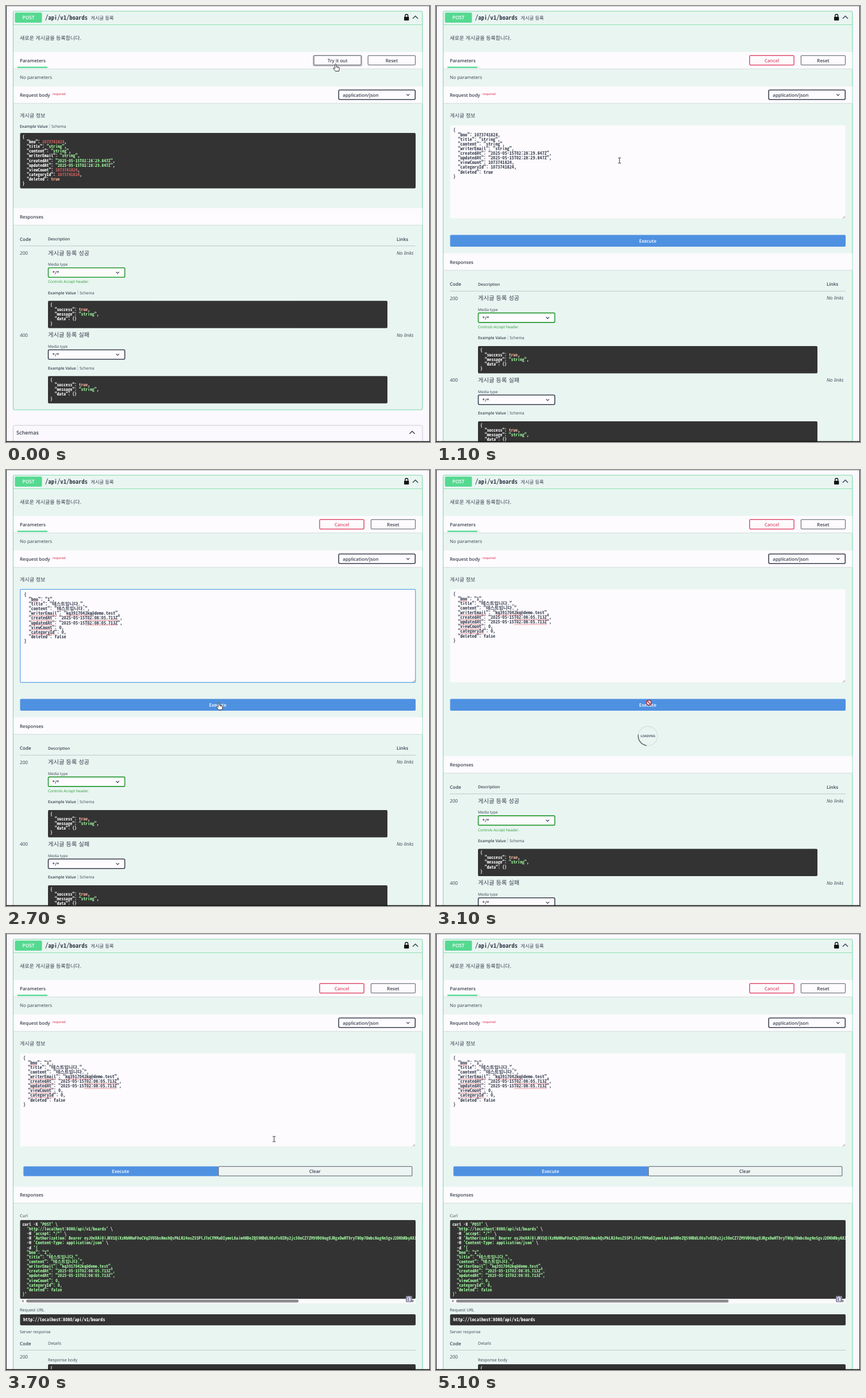
Animation of 737 by 759 pixels, one loop 5600 ms. Source, as an HTML page:

```html
<!DOCTYPE html>
<html lang="ko">
<head>
<meta charset="utf-8">
<title>POST /api/v1/boards</title>
<style>
  html, body { margin: 0; width: 100%; height: 100%; overflow: hidden; background: #fbf9fd; }
  svg { display: block; }
  text {
    font-family: 'Open Sans', 'Noto Sans', 'Noto Sans CJK KR', sans-serif;
    fill: #3b4151; white-space: pre; text-rendering: geometricPrecision;
  }
  .ko { font-family: 'Noto Sans CJK KR', 'Noto Sans CJK', sans-serif; }
  .mono { font-family: 'Noto Sans Mono CJK KR', 'Liberation Mono', monospace; font-weight: 700; }
</style>
</head>
<body>
<svg id="stage" width="737" height="759" viewBox="0 0 737 759"></svg>
<script>
const LOOP = 5600, STEP = 100;
const EDIT = 500, FOCUS = 1200, PASTE = 1700, SPELL = 2300, LOADING = 3100, DONE = 3700, LEAVE = 4800;
const INK = '#3b4151', MINT = '#e9f5f1', WHITE = '#fdfbfe', GREEN = '#56d991',
      RED = '#e0506f', BLUE = '#4f91e1', DARK = '#333', LIME = '#a2fca2';

// Monospace sizes follow from the advance of one character cell.
const pen = document.createElement('canvas').getContext('2d');
pen.font = "700 100px 'Noto Sans Mono CJK KR', 'Liberation Mono', monospace";
const cellPerEm = pen.measureText('0').width / 100;
const TEXT_CELL = 4.07, CODE_CELL = 3.83, TEXT_LEADING = 8.06, CODE_LEADING = 8.15;

const rect = (x, y, w, h, fill, more = '') =>
  `<rect x="${x}" y="${y}" width="${w}" height="${h}" fill="${fill}" ${more}/>`;
const stroke = (color, width = 1, rx = 2) => `stroke="${color}" stroke-width="${width}" rx="${rx}"`;
const path = (d, color, width = 1, more = 'fill="none"') =>
  `<path d="${d}" stroke="${color}" stroke-width="${width}" ${more}/>`;
const text = (x, y, str, size = 8, weight = 400, more = '') =>
  `<text x="${x}" y="${y}" font-size="${size}" font-weight="${weight}" ${more}>${str}</text>`;
const bold = (x, y, str, size = 8, more = '') => text(x, y, str, size, 600, more);
const centered = (x, y, str, size = 8, color = INK) =>
  bold(x, y, str, size, `text-anchor="middle" style="fill:${color}"`);
const ko = (x, y, str, size) => text(x, y, str, size, 400, 'class="ko"');
const mono = (x, y, str, cell, color = INK) =>
  `<text class="mono" x="${x}" y="${y}" font-size="${cell / cellPerEm}" style="fill:${color}">${str}</text>`;
const group = (id, body) => `<g id="${id}">${body}</g>`;
const tint = (str, color) => `<tspan fill="${color}" style="fill:${color}">${str}</tspan>`;

const chevron = (x, y, size, dir = 1, width = 1.2) =>
  path(`M${x - size} ${y - dir * size / 2}l${size} ${dir * size}l${size} ${-dir * size}`, INK, width);
const select = (x, y, w, label, color = INK) =>
  rect(x, y, w, 16.5, WHITE, stroke(color, 1.6)) + bold(x + 7, y + 11.5, label) + chevron(x + w - 12.5, y + 8.4, 2.6);
const button = (x, w, label) =>
  rect(x, 86.3, w, 16.4, WHITE, stroke('#777a82', 1.3, 1.5)) + centered(x + w / 2, 97.7, label);
const band = (y, h = 29) =>
  rect(13, y, 710.5, h, WHITE) + rect(13, y + h, 710.5, 1, '#d3dfdc');
const tabs = (x, y) =>
  bold(x, y, 'Example Value', 6.9) + rect(x + 51.5, y - 7, .7, 8.5, '#a9b3b5') + text(x + 55, y, 'Schema', 6.9);

const code = (x, y, w, h, lines, cell = CODE_CELL, pad = 4) =>
  rect(x, y, w, h, DARK, 'rx="2"') + `<svg x="${x}" y="${y}" width="${w}" height="${h}">` +
  lines.map((line, i) => mono(pad, 9.8 + i * CODE_LEADING, line, cell, '#fff')).join('') + '</svg>';
const highlight = line => line.replace(/"[^"]*"(:?)|\d{2,}|true/g, (part, colon) =>
  colon ? part : tint(part, part[0] === '"' ? LIME : part === 'true' ? '#fcb49c' : '#d36363'));

const json = fields =>
  ['{', ...fields.map(([key, value], i) => `  "${key}": ${value}${i < fields.length - 1 ? ',' : ''}`), '}'];
const board = (bno, title, email, time, count, deleted) => json([
  ['bno', bno], ['title', title], ['content', title], ['writerEmail', email],
  ['createdAt', time], ['updatedAt', time], ['viewCount', count], ['categoryId', count], ['deleted', deleted]]);
const sample = board('1073741824', '"string"', '"string"', '"2025-05-15T02:28:29.847Z"', '1073741824', 'true');
const posted = board('"1"', '"테스트입니다."', '"kq3917042kq@demo.test"', '"2025-05-15T02:08:05.713Z"', '0', 'false');
const reply = json([['success', 'true'], ['message', '"string"'], ['data', '{}']]);

function makeToken(length) {
  const letters = 'ABCDEFGHIJKLMNOPQRSTUVWXYZabcdefghijklmnopqrstuvwxyz0123456789';
  let seed = 17, out = 'eyJ0eXAiOiJKV1Qi';
  while (out.length < length) {
    seed = (seed * 16807) % 2147483647;
    out += letters[seed % letters.length];
  }
  return out;
}

const curl = [
  "curl -X 'POST' \\",
  "  'http://localhost:8080/api/v1/boards' \\",
  "  -H 'accept: */*' \\",
  `  -H 'Authorization: Bearer ${makeToken(160)}`,
  "  -H 'Content-Type: application/json' \\",
  "  -d '{"
].map(line => line.replace(/'[^']*'?/g, part => tint(part, LIME)))
  .concat([...posted.slice(1, -1), "}'"].map(line => tint(line, LIME)));

const editorText = lines => lines.map((line, i) => mono(30, 219 + i * TEXT_LEADING, line, TEXT_CELL)).join('');

// Spell-check marks: line, first cell, cell count.
const misspelt = [[1, 3, 3], [4, 3, 11], [4, 18, 11], [5, 3, 9], [5, 26, 14],
                  [6, 3, 9], [6, 26, 14], [7, 3, 9], [8, 3, 10]];
const squiggle = ([line, start, count]) => {
  const bumps = Math.round(count * TEXT_CELL / 3);
  return path(`M${30 + start * TEXT_CELL} ${221 + line * TEXT_LEADING}` + 'l1.5 -1.3l1.5 1.3'.repeat(bumps), '#dc4a50', .7);
};

const responseRow = (y, status, title, accept) => {
  const end = y + (accept ? 0 : -11.8);
  return text(24, y + 3.5, status, 8.2) + ko(73, y + 4, title, 10.3) +
    text(679, y + 3.3, 'No links', 8.3, 400, 'font-style="italic"') +
    text(73, y + 22.8, 'Media type', 6.6) +
    select(73.5, y + 26.2, 133, '*/*', accept ? '#2a9a35' : INK) +
    (accept ? text(73, y + 52.9, 'Controls Accept header.', 6.45, 400, 'style="fill:#2a9a35"') : '') +
    tabs(73, end + 72) + code(73, end + 83.7, 590, 47.5, reply.map(highlight));
};

const frameTop =
  rect(15.5, 11.5, 47, 17.5, GREEN, 'rx="2"') + centered(39, 23.3, 'POST', 8.3, '#fff') +
  mono(68, 24, '/api/v1/boards', 5.28) + ko(147, 23.5, '게시글 등록', 8.3) +
  rect(692, 18.8, 8.4, 6.4, '#111', 'rx="1"') + path('M693.7 19v-2a2.5 2.5 0 0 1 5 0v2', '#111', 1.3) +
  chevron(711.5, 19.8, 4.6, -1, 1.4) +
  rect(12.5, 32, 711.5, 1, '#8fe0b8') +
  ko(24, 58.5, '새로운 게시글을 등록합니다.', 9) +
  band(80) + bold(24, 97.8, 'Parameters') + rect(20, 105.6, 52, 2.4, GREEN) +
  text(24, 126.5, 'No parameters') +
  band(140) + bold(24, 157.8, 'Request body') + text(81, 154.5, 'required', 5.5, 600, `style="fill:${RED}"`) +
  select(578.3, 146.3, 133, 'application/json') +
  ko(24, 194.3, '게시글 정보', 9.1);

const idle =
  rect(534.5, 86.5, 83.5, 17.5, 'none', 'stroke="#000" stroke-opacity=".22" stroke-width="2.6" rx="2"') +
  button(535.3, 82, 'Try it out') + button(629.3, 82.2, 'Reset') +
  tabs(24, 212) + code(24.5, 221, 687.5, 96.5, sample.map(highlight));

const editor =
  rect(545.2, 86.3, 77, 16.4, WHITE, 'id="cancelBox" stroke-width="1.5" rx="1.5"') +
  '<text id="cancelLabel" x="583.7" y="97.7" font-size="8" font-weight="600" text-anchor="middle">Cancel</text>' +
  button(634.5, 77, 'Reset') +
  rect(24.7, 207.8, 687, 162, WHITE, 'id="area" stroke-width="1.4" rx="2"') +
  path('M707 369.5l4 -4M709.5 369.5l1.5 -1.5', '#777', .8) +
  group('typed', group('before', editorText(sample)) + group('after', editorText(posted)) +
    group('marks', misspelt.map(squiggle).join('')) +
    rect(34.4, 292.5, .8, 8, '#222', 'id="caret"'));

const execute = rect(24.5, 398.5, 687.5, 20.5, BLUE, 'rx="2"') + centered(368, 411.7, 'Execute', 8, '#fff');

const loader =
  '<circle cx="368.3" cy="463" r="16.8" fill="none" stroke="#555" stroke-opacity=".12" stroke-width="1.4"/>' +
  group('spinner', path('M356.4 451.1a16.8 16.8 0 0 1 23.8 0', '#626866', 1.5)) +
  centered(368.3, 465.3, 'LOADING', 5.7);

const responses =
  band(352) + bold(24, 370.3, 'Responses') +
  bold(24, 408.6, 'Code') + bold(73, 408.2, 'Description', 6.9) + bold(679, 408.6, 'Links') +
  rect(24, 417.2, 688, .9, '#b9c6c6') +
  responseRow(429.5, '200', '게시글 등록 성공', true) +
  responseRow(572.3, '400', '게시글 등록 실패', false) +
  rect(12.5, 730, 711.5, 60, '#faf8fc', stroke('#c9c9cf', 1, 3)) +
  bold(18, 746.3, 'Schemas', 9.1) + chevron(706, 742.5, 4.6, -1, 1.4);

const result =
  rect(30.3, 404.5, 339, 17, BLUE, 'rx="2"') + centered(199, 416.3, 'Execute', 8, '#fff') +
  rect(369.3, 404.7, 336.5, 16.5, '#edf5f3', stroke('#777a82', 1.3)) + centered(537, 416.3, 'Clear') +
  band(440, 28) + bold(24, 457, 'Responses') +
  text(24, 493, 'Curl', 7.2) + code(24.5, 498, 687.5, 137, curl) +
  rect(24.5, 635, 687.5, 8, '#fbfafc') + rect(35, 636.6, 473.5, 5, '#8b8a8e', 'rx="2.5"') +
  '<path d="M30.5 636.5v5l-3.5 -2.5zM706 636.5v5l3.5 -2.5z" fill="#8b8a8e"/>' +
  rect(695, 630, 11, 11, '#8583a0', 'rx="2"') +
  path('M697.5 633h5v6h-5zM699.5 632h2M700 636h4.5M702 634.5l-2 1.5l2 1.5', '#fff', .9) +
  text(24, 656.8, 'Request URL', 7.2) + rect(24.5, 662, 687.5, 19.3, DARK, 'rx="2"') +
  mono(30, 674.3, 'http://localhost:8080/api/v1/boards', TEXT_CELL, '#fff') +
  text(24, 694.8, 'Server response', 7.1) + bold(24, 715.5, 'Code') + text(73, 715, 'Details', 7.2) +
  rect(24, 724, 688, .9, '#b9c6c6') + text(24, 739.3, '200', 8.2) +
  text(73, 744, 'Response body', 7.2) + code(73, 749, 639, 14, ['{']);

// Pointer shapes share their hot spot at 0,0.
const pointers =
  group('hand', '<path d="M-1.2 .5q1.2 -1.6 2.3 0v4.2l4 .8q1.6 .5 1.4 2.2l-.8 4.8h-6l-4 -5q.3 -1.6 2 -.4l1.1 1z" fill="#fff" stroke="#333" stroke-width="1"/>' +
    path('M2.3 5v2.3M4.4 5.4v2', '#333', .6)) +
  group('beam', path('M-2.5 -4.8q2 0 2.5 1q.5 -1 2.5 -1M0 -4v8M-2.5 4.8q2 0 2.5 -1q.5 1 2.5 1', '#333', 1)) +
  group('arrow', '<path d="M0 0v10.5l2.5 -2.3l1.8 4l1.7 -.8l-1.7 -3.8h3.2z" fill="#fff" stroke="#222" stroke-width=".8"/>') +
  group('ban', '<circle r="4.3" fill="#f3e9ee" stroke="#a23a48" stroke-width="1.7"/>' + path('M-3 -3l6 6', '#a23a48', 1.7));

document.getElementById('stage').innerHTML =
  rect(0, 0, 737, 759, '#fbf9fd') +
  rect(12.5, 9, 711.3, 694, MINT, 'id="block" ' + stroke('#7fdcae', 1.2, 3)) +
  frameTop + group('idle', idle) + group('editor', editor) + group('execute', execute) + group('loader', loader) +
  group('responses', responses) + group('result', result) +
  rect(0, 0, 737, .8, '#b5b5ba') + rect(0, 0, 1, 759, '#222') + rect(736, 0, 1, 759, '#222') + rect(0, 757.6, 737, 1.4, '#111') +
  group('pointer', pointers);

const el = {};
document.querySelectorAll('[id]').forEach(node => el[node.id] = node);
const show = (name, on) => el[name].style.display = on ? '' : 'none';
const clamp = v => Math.max(0, Math.min(1, v));
const ease = p => p * p * (3 - 2 * p);
const mix = (a, b, p) => a + (b - a) * p;

const route = [[0, 573, 101], [600, 573, 101], [1100, 319, 269], [2200, 319, 269], [2600, 370, 405],
               [3300, 370, 405], [3700, 466, 357], [4100, 466, 357], [4700, 690, 24], [4800, 705, -14]];
function pointerAt(t) {
  const i = Math.max(1, route.findIndex(stop => stop[0] > t));
  const [t0, x0, y0] = route[i - 1], [t1, x1, y1] = route[i];
  const p = ease(clamp((t - t0) / (t1 - t0)));
  return [mix(x0, x1, p), mix(y0, y1, p)];
}
function pointerKind(x, y, t) {
  if (y > 208 && y < 370) return 'beam';
  if (y > 398 && y < 420) return t >= LOADING && t < DONE ? 'ban' : 'hand';
  return y < 32 || (y > 86 && y < 103 && x > 545) ? 'hand' : 'arrow';
}

function draw(t) {
  const editing = t >= EDIT, loading = t >= LOADING && t < DONE, done = t >= DONE;
  const focused = t >= FOCUS && t < LOADING;
  const shift = loading ? 146.2 : editing ? 78.7 : 0;

  show('idle', !editing);
  show('editor', editing);
  show('execute', editing && !done);
  show('loader', loading);
  show('responses', !done);
  show('result', done);
  el.responses.setAttribute('transform', `translate(0 ${shift})`);
  el.block.setAttribute('height', done ? 900 : 694 + shift);

  show('before', t < PASTE);
  show('after', t >= PASTE);
  show('marks', t >= SPELL);
  show('caret', focused && t >= PASTE && Math.floor((t - PASTE) / 530) % 2 === 0);
  el.area.setAttribute('stroke', focused ? '#6fb0ea' : 'none');
  el.typed.setAttribute('transform', focused ? 'translate(1.5 1.2)' : '');

  const warm = clamp((t - EDIT) / 300);
  const cancel = (r, g, b) => `rgb(${mix(r, 224, warm)},${mix(g, 80, warm)},${mix(b, 111, warm)})`;
  el.cancelBox.setAttribute('stroke', cancel(142, 100, 112));
  el.cancelLabel.style.fill = cancel(98, 80, 94);

  const turn = ease(((t - LOADING + LOOP) % 1000) / 1000) * 360;
  el.spinner.setAttribute('transform', `rotate(${turn} 368.3 463)`);

  show('pointer', t < LEAVE);
  if (t < LEAVE) {
    const [x, y] = pointerAt(t), kind = pointerKind(x, y, t);
    el.pointer.setAttribute('transform', `translate(${x} ${y})`);
    ['hand', 'beam', 'arrow', 'ban'].forEach(name => show(name, name === kind));
  }
}

const start = performance.now();
function tick() {
  const t = (performance.now() - start) % LOOP;
  draw(Math.floor(t / STEP) * STEP);
  requestAnimationFrame(tick);
}
tick();
</script>
</body>
</html>
```
